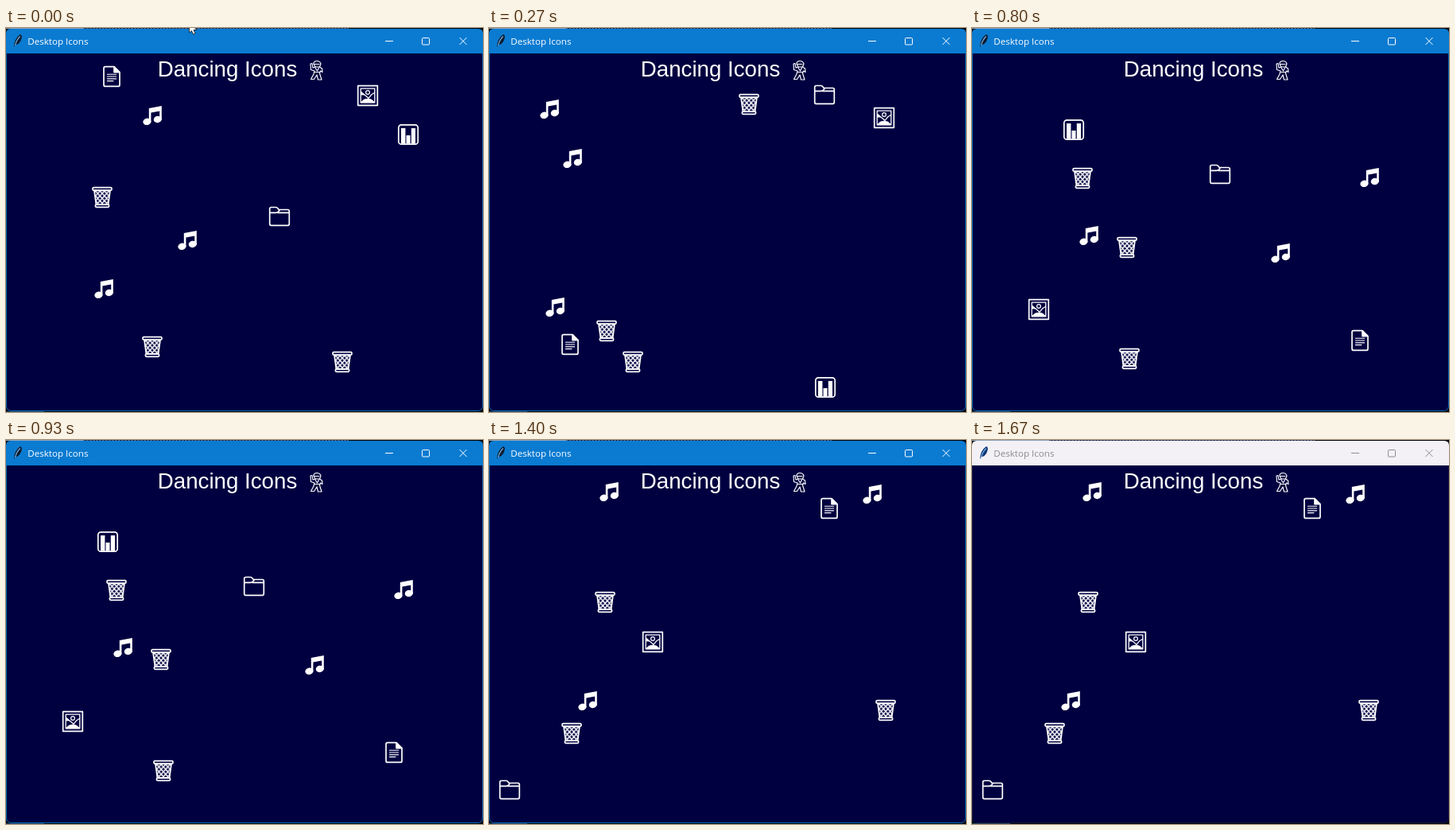
An HTML page that plays this animation: 600 by 483 pixels, repeating every 1.74 s.

```html
<!DOCTYPE html>
<html lang="en">
<head>
<meta charset="utf-8">
<title>Desktop Icons</title>
<style>
  html, body { margin: 0; width: 100%; height: 100%; overflow: hidden; background: #04060c; }
  svg { display: block; width: 100%; height: 100%; }
  .line { fill: none; stroke: #fff; stroke-linejoin: round; stroke-linecap: round; }
  .solid { fill: #fff; }
  .heading { font: 27.7px "Liberation Sans", Arial, sans-serif; fill: #fff; }
  .caption { font: 11.6px "Open Sans", "Noto Sans", sans-serif; fill: var(--ink); }
  .controls { fill: none; stroke: var(--ink); stroke-width: 1; }
  #window { --bar: #0a7bd1; --ink: #fff; --edge: #0a68b4; --quill: #101c30;
    animation: blur 1740ms step-end infinite; }
  #cursor { animation: leave 1740ms step-end infinite; }
  @keyframes blur {
    95.92% { --bar: #f3f1f6; --ink: #8b8b90; --edge: #16163a; --quill: #12377a; }
  }
  @keyframes leave { 4%, 100% { visibility: hidden; } }
</style>
</head>
<body>
<svg viewBox="0 0 600 483" preserveAspectRatio="none">
  <defs>
    <pattern id="mesh" width="5.6" height="6.2" x="-2.8" y="-8" patternUnits="userSpaceOnUse">
      <path class="line" stroke-width="1.45" d="M0 0L5.6 6.2M5.6 0L0 6.2"/>
    </pattern>
    <g id="note" class="solid">
      <path d="M-4.2-9 11.8-12V5.5H9.2V-5.5L-1.6-3.4V8.5H-4.2Z"/>
      <ellipse cx="-6.6" cy="7.8" rx="5.1" ry="4.2" transform="rotate(-12 -6.6 7.8)"/>
      <ellipse cx="6.8" cy="4.9" rx="5.1" ry="4.2" transform="rotate(-12 6.8 4.9)"/>
    </g>
    <g id="trash" class="line" stroke-width="1.7">
      <path d="M-10-8.5H10L7.6 9H-7.6Z" fill="url(#mesh)"/>
      <rect x="-12" y="-12.4" width="24" height="3.6" rx="1.5"/>
      <rect x="-8.6" y="9.2" width="17.2" height="3.2" rx="1.3"/>
    </g>
    <g id="folder" class="line" stroke-width="1.7">
      <path d="M-12.3 9V-9.5Q-12.3-11.5-10.3-11.5H-4.5Q-3-11.5-2-10L-.8-8.5H10.3Q12.3-8.5 12.3-6.5V9Q12.3 11.4 10.3 11.4H-10.3Q-12.3 11.4-12.3 9ZM-12-4.7H-4.5Q-2.8-4.7-1.5-5.8L0-7.8"/>
      <path d="M-2-4.7H12"/>
    </g>
    <g id="doc" class="line" stroke-width="1.7">
      <path d="M-8-12.4H3L10-5.4V10.4Q10 12.4 8 12.4H-8Q-10 12.4-10 10.4V-10.4Q-10-12.4-8-12.4Z"/>
      <path class="solid" d="M3-12V-5.4H9.6Z"/>
      <path stroke-width="1.15" d="M-5.6-2.8H5.6M-5.6 0H5.6M-5.6 2.8H5.6M-5.6 5.6H2"/>
    </g>
    <g id="picture" class="line" stroke-width="1.7">
      <rect x="-12.3" y="-12.3" width="24.6" height="24.6"/>
      <rect x="-8.8" y="-8.8" width="17.6" height="17.6" stroke-width="1.3"/>
      <circle cx="0" cy="-4" r="2.4" stroke-width="1.2"/>
      <path stroke-width="1.2" d="M-8.5-4.5-4-1 1 3.3 5-1.5 8.5-3.6"/>
      <path class="solid" stroke-width=".8" d="M-8.5 8.3Q-5 4 0 4T8.5 8.3ZM-8.5-4.5V-1L-4.5-1Z"/>
    </g>
    <g id="chart">
      <rect class="line" stroke-width="1.7" x="-12.2" y="-12.2" width="24.4" height="24.4" rx="3.5"/>
      <path class="solid" d="M-9-8H-3.6V11.5H-9ZM-2.5 1H2.5V11.5H-2.5ZM3.8-8H9V11.5H3.8Z"/>
    </g>
  </defs>

  <rect width="600" height="483" fill="#04060c"/>
  <path d="M0 .5H97" stroke="#8fa3b8"/>
  <path d="M97 .5H431" stroke="#50587c" stroke-dasharray="3 1"/>
  <path d="M0 482.5H48" stroke="#27445f"/>

  <g id="window">
    <path fill="#000040" stroke="var(--edge)" d="M.5 8V475Q.5 481.5 7 481.5H593Q599.5 481.5 599.5 475V8Z"/>
    <path fill="var(--bar)" d="M0 32V7Q0 1 6 1H594Q600 1 600 7V32Z"/>
    <path fill="var(--quill)" d="M10 24Q10.500 13 18 8Q21.500 9 18.500 16Q16 21 12 21Z"/>
    <path fill="none" stroke="#7db7e6" stroke-width="1.1" d="M11.500 22Q13 15 17.800 10.500"/>
    <text class="caption" x="27.300" y="21">Desktop Icons</text>
    <path class="controls" d="M477 16.500H487M570.500 12 579.500 21M579.500 12 570.500 21"/>
    <rect class="controls" x="523.500" y="12.500" width="9" height="8.500" rx="1"/>
  </g>

  <text class="heading" x="190.800" y="61">Dancing Icons</text>
  <g class="line" stroke-width="1.150">
    <path d="M387 45Q387 41.500 391 41.500T396 45L394.500 49H389ZM387 45.500H394"/>
    <path d="M389 49 386 50 385 44.500 383 45 383.500 52.500 388 54 387 58 383.500 64.500H387.500L391 59 392.500 65H397L394.500 57 395.500 54 398 55.500 397.500 51 394.500 49"/>
    <path d="M389 50 391.500 54 393.500 50M388 55.500H394.500"/>
  </g>
  <g id="icons"></g>
  <path id="cursor" fill="#fff" stroke="#111" stroke-width=".8" d="M230.500-7V6L233.500 3.500 235.500 8 238 7 236 2.500H240Z"/>
</svg>
<script>
  const LOOP = 1740;
  const hops = [0, 265, 525, 795, 1065, 1395];
  // One "x,y" centre per hop; an icon without one is out of view.
  const dancers = [
    ["doc", "133,61 102,398 185,122 488,393 273,369 428,86"],
    ["note", "184,110 76,102 363,119 500,188 428,73 151,65"],
    ["note", "228,267 105,164 44,148 147,261 70,372 482,68"],
    ["note", "123,328 83,351 288,272 388,283 254,397 124,328"],
    ["trash", "121,213 327,96 130,202 139,189 48,177 146,204"],
    ["trash", "184,401 148,381 173,232 195,276 257,325 499,340"],
    ["trash", "423,420 181,420 250,315 198,416 444,300 104,369"],
    ["folder", "344,237 422,84 212,286 312,184 352,304 26,440"],
    ["picture", "455,85 497,113 247,355 84,354 463,58 206,254"],
    ["chart", "506,134 423,452 439,87 128,128 500,134"]
  ].map(([shape, path]) => {
    const node = document.createElementNS("http://www.w3.org/2000/svg", "use");
    node.setAttribute("href", "#" + shape);
    document.getElementById("icons").append(node);
    return { node, spots: path.split(" ") };
  });

  const start = document.timeline.currentTime ?? performance.now();

  function draw(now) {
    const time = Math.max(0, now - start) % LOOP;
    const hop = hops.findLastIndex(at => time >= at);
    for (const { node, spots } of dancers) {
      const spot = spots[hop];
      node.setAttribute("visibility", spot ? "visible" : "hidden");
      if (spot) node.setAttribute("transform", `translate(${spot})`);
    }
    requestAnimationFrame(draw);
  }
  draw(start);
</script>
</body>
</html>
```
